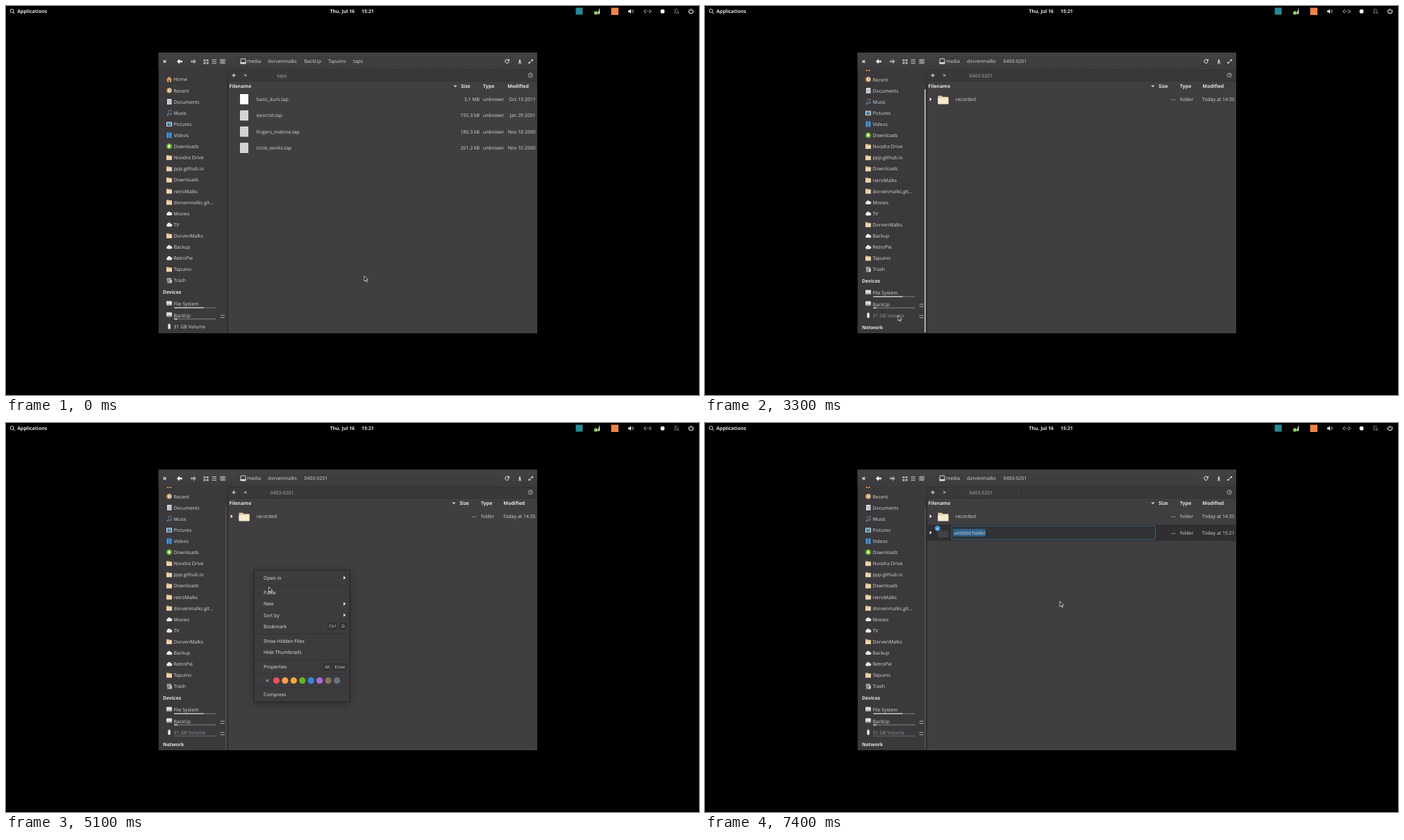
Recreate the animation shown at these times as an HTML page with a canvas. Size 998x561 px, loop 8000 ms.

```html
<!DOCTYPE html>
<html lang="en">
<head>
<meta charset="utf-8">
<title>File manager</title>
<style>
  html, body { margin: 0; width: 100%; height: 100%; overflow: hidden; background: #000; }
  canvas { display: block; }
</style>
</head>
<body>
<canvas id="stage" width="998" height="561"></canvas>
<script>
const ctx = document.getElementById('stage').getContext('2d');
const LOOP = 8000, STEP = 100, TAU = Math.PI * 2;
const LIGHT = '#d6d5d7', WHITE = '#f4f4f4';

// Times of the hard changes, in ms
const AT = { sidebar: 1000, network: 2300, open: 3200, usage: 3600, leave: 4300,
             menu: 4600, submenu: 5400, created: 6800, rename: 7000 };
const POINTER = [
  [400, 516, 389], [1200, 286, 459], [1300, 286, 459], [1500, 284, 459], [1800, 284, 459],
  [2300, 284, 454], [2600, 284, 454], [3000, 278, 446], [4100, 278, 446], [4500, 357, 212],
  [4900, 357, 212], [5300, 400, 260], [5800, 440, 262], [6100, 492, 262], [6500, 511, 259],
  [6900, 511, 259], [7200, 511, 257]
];

const smooth = (t, a, b) => {
  const p = Math.min(1, Math.max(0, (t - a) / (b - a)));
  return p * p * (3 - 2 * p);
};

function pointerAt(t) {
  let [, x, y] = POINTER[0];
  for (let i = 1; i < POINTER.length; i++) {
    const [start] = POINTER[i - 1], [end, nx, ny] = POINTER[i];
    const p = smooth(t, start, end);
    x += (nx - x) * p;
    y += (ny - y) * p;
  }
  return [x, y];
}

function rect(x, y, w, h, color) {
  ctx.fillStyle = color;
  ctx.fillRect(x, y, w, h);
}
function box(x, y, w, h, r, fill, stroke) {
  ctx.beginPath();
  ctx.roundRect(x, y, w, h, r);
  paint(fill, stroke);
}
function paint(fill, stroke, width = 1) {
  if (fill) { ctx.fillStyle = fill; ctx.fill(); }
  if (stroke) { ctx.strokeStyle = stroke; ctx.lineWidth = width; ctx.stroke(); }
}
function disc(x, y, r, fill, stroke, width) {
  ctx.beginPath();
  ctx.arc(x, y, r, 0, TAU);
  paint(fill, stroke, width);
}
// SVG path data drawn around (x, y)
function shape(x, y, d, fill, stroke, width) {
  ctx.save();
  ctx.translate(x, y);
  const path = new Path2D(d);
  if (fill) { ctx.fillStyle = fill; ctx.fill(path); }
  if (stroke) { ctx.strokeStyle = stroke; ctx.lineWidth = width || 1; ctx.stroke(path); }
  ctx.restore();
}
function text(str, x, y, { color = LIGHT, bold = false, align = 'left', size = 6.93 } = {}) {
  ctx.font = `${bold ? 700 : 400} ${size}px "Open Sans", "Noto Sans", sans-serif`;
  ctx.textAlign = align;
  ctx.fillStyle = color;
  ctx.fillText(str, x, y + 2.4);
}
const bold = (str, x, y) => text(str, x, y, { bold: true, color: '#e6e6e6' });
const right = (str, x, y, color) => text(str, x, y, { align: 'right', color });
const cross = (x, y, r, color, w) => shape(x, y, `M${-r} ${-r}L${r} ${r}M${r} ${-r}L${-r} ${r}`, null, color, w);
const triangle = (x, y) => shape(x, y, 'M-1.3-2.6L1.6 0L-1.3 2.6z', WHITE);

const icons = {
  home(y) {
    shape(235, y, 'M-4 0L0-4L4 0H3V4H-3V0z', '#d99a62');
    rect(234, y + 1, 2, 3, '#72472d');
  },
  recent(y) {
    disc(235, y, 3.9, '#c68a4e');
    disc(235.5, y - .3, 2.6, '#f0e4d2');
    shape(235, y, 'M.5-2V0H2', null, '#5a4632', .8);
  },
  documents(y) {
    box(232, y - 4, 6.5, 8, .5, '#d8dde0');
    for (let i = -2; i < 3; i += 2) rect(233.3, y + i, 4, .7, '#87929a');
  },
  music(y) {
    shape(235, y, 'M-1 3V-3L3-4V2', null, '#62809a', .9);
    disc(233, y + 3, 1.3, '#62809a');
    disc(237, y + 2, 1.3, '#62809a');
  },
  pictures(y) {
    box(231, y - 3, 8, 6.5, .5, '#d5e2ea');
    rect(232, y - 2, 6, 4.5, '#4f8fbd');
    shape(235, y, 'M-3 2.5L-1 0L1 2L2 1L3 2.5z', '#456b4a');
  },
  videos(y) {
    box(231.5, y - 4, 7, 8, .5, '#2f7fc1');
    for (let i = -3; i < 4; i += 2) {
      rect(232, y + i, .8, 1, '#cfe6f7');
      rect(237.2, y + i, .8, 1, '#cfe6f7');
    }
  },
  downloads(y) {
    disc(235, y, 4, '#62b325');
    shape(235, y, 'M-.9-2.3H.9V0H2.4L0 2.5L-2.4 0H-.9z', '#fff');
  },
  folder(y) {
    shape(235, y, 'M-4-3.4H-.8L0-2.6H4V3.6H-4z', '#d6b582');
    rect(231, y - 1.5, 8, 5.1, '#ecd5ac');
  },
  cloud(y) {
    shape(235, y, 'M-2.4 3A2 2 0 0 1-2.6-.8A2.6 2.6 0 0 1 2.2-1.2A2.1 2.1 0 0 1 2.4 3z', '#ececec');
  },
  trash(y) {
    shape(235, y, 'M-3.5-3.5H3L2.5 4H-2.5z', '#a9aaad');
    for (const x of [-1.5, .3]) rect(235 + x, y - 2, .8, 5, '#626367');
    rect(236.5, y - 1, 2.3, 4.6, '#d9d9d9');
  },
  drive(y) {
    box(231, y - 4.4, 8, 6.5, 1, '#dcdcdd');
    rect(231.3, y + .2, 7.4, 1.6, '#98989b');
  },
  stick(y) {
    box(233.4, y - 3.6, 3.4, 7.4, 1, '#eeeeee');
    rect(234, y - 4.2, 2.2, 1.8, '#a0a0a3');
  }
};

const PLACES = [
  ['Home', 'home'], ['Recent', 'recent'], ['Documents', 'documents'], ['Music', 'music'],
  ['Pictures', 'pictures'], ['Videos', 'videos'], ['Downloads', 'downloads'],
  ['Noodra Drive', 'folder'], ['ppp.github.io', 'folder'], ['Downloads', 'folder'],
  ['retroMalks', 'folder'], ['dorvenmalks.git…', 'folder'], ['Movies', 'cloud'], ['TV', 'cloud'],
  ['DorvenMalks', 'folder'], ['Backup', 'cloud'], ['RetroPie', 'cloud'], ['Tapuino', 'folder'],
  ['Trash', 'trash']
];
const FILES = [
  ['basic_kurs.tap', '3.1 MB', 'Oct 13 2011'], ['exorcist.tap', '155.3 kB', 'Jan 29 2001'],
  ['fingers_malone.tap', '180.3 kB', 'Nov 18 2000'], ['icicle_works.tap', '261.2 kB', 'Nov 10 2000']
];

function drawPanel() {
  disc(8.6, 7, 2.5, null, WHITE, .9);
  shape(8.6, 7, 'M1.8 1.8L4.2 4.4', null, WHITE, 1);
  bold('Applications', 16.3, 7.7);
  bold('Thu, Jul 16', 466.5, 7.7);
  bold('15:21', 512, 7.7);
  rect(820.5, 2.5, 10, 10, '#268994');
  shape(851, 7.5, 'M4-5V4H1zM0-1V4H-2z', '#e8e8e8');
  disc(849.5, 10, 2.8, '#6eb63b');
  shape(849.5, 10, 'M-1.4 0L-.3 1.2L1.6-1.2', null, '#fff', .8);
  rect(871.5, 2.5, 10.5, 10.5, '#ee8445');
  shape(900, 7.7, 'M-4-1.3H-2.3L0-3.4V3.4L-2.3 1.3H-4z', WHITE);
  shape(900, 7.7, 'M1.2-1.6Q2.4 0 1.2 1.6M2.6-2.8Q4.6 0 2.6 2.8', null, '#bbb', .8);
  shape(924, 7.7, 'M-2.5-2.6L-5 0L-2.5 2.6M2.5-2.6L5 0L2.5 2.6', null, WHITE, 1);
  for (const x of [-1.6, 0, 1.6]) disc(924 + x, 7.7, .5, WHITE);
  disc(945.5, 7.7, 3, WHITE);
  shape(965.5, 7.5, 'M-3.3 2.5Q-2 1-2-1Q-1.8-3.5 0-3.5Q1.8-3.5 2-1Q2 1 3.3 2.5zM-3.5-3.5L3.5 4', null, '#777', .9);
  shape(986.5, 7.7, 'M-1.7-2.6A3.1 3.1 0 1 0 1.7-2.6M0-4V-.2', null, WHITE, 1.1);
}

function drawHeader(opened) {
  const shade = ctx.createLinearGradient(0, 68, 0, 92);
  shade.addColorStop(0, '#444245');
  shade.addColorStop(1, '#3c3a3d');
  rect(219.5, 67.5, 545.5, 24.5, shade);
  rect(219.5, 67.5, 545.5, .8, '#4c4a4e');
  box(331.5, 72.5, 379, 15, 2, '#3f3d40');
  cross(228.5, 80, 1.9, WHITE, 1.2);
  shape(250, 80, 'M-4 0L0-3.7V-1.3H4V1.3H0V3.7z', WHITE);
  shape(270, 80, 'M4 0L0-3.7V-1.3H-4V1.3H0V3.7z', '#a3a2a4');
  for (const x of [284.5, 288.7]) for (const y of [77, 81]) rect(x, y, 3, 2.7, '#b2b1b3');
  for (let i = 0; i < 3; i++) rect(296.5, 77 + i * 2.5, 6.5, 1.1, '#b2b1b3');
  ctx.strokeStyle = '#b2b1b3';
  ctx.lineWidth = .9;
  for (let i = 0; i < 3; i++) ctx.strokeRect(308.8 + i * 2.2, 77.3, 2.2, 5.4);

  box(338, 76, 7, 7, 1, null, LIGHT);
  rect(337.5, 81, 8, 2.6, LIGHT);
  const crumbs = [['media', 347], ['dorvenmalks', 377]].concat(
    opened ? [['0403-0201', 429.5]] : [['BackUp', 429.5], ['Tapuino', 464], ['taps', 500]]);
  for (const [name, x] of crumbs) text(name, x, 80);

  shape(721.5, 79.7, 'M2.2-1.6A2.7 2.7 0 1 0 2.7 .6', null, WHITE, 1);
  shape(721.5, 79.7, 'M3.4-3.4V-.3H.4z', WHITE);
  shape(740, 80, 'M-.7-3H.7V0H2.2L0 2L-2.2 0H-.7zM-2.3 2.4H2.3V3.3H-2.3z', WHITE);
  shape(755.7, 80, 'M.5-3H3.2V-.3zM-3.2.3V3H-.5z', WHITE);
  shape(755.7, 80, 'M-2 2L2-2', null, WHITE, 1);

  rect(319, 92, 446, 16.5, '#3a383b');
  rect(319, 92, 446, .7, '#302e31');
  rect(335.5, 92, .7, 16, '#353336');
  rect(455, 92, .7, 16, '#312f32');
  rect(319, 108, 446, .7, '#353336');
  shape(328, 100, 'M-2.7 0H2.7M0-2.7V2.7', null, WHITE, 1);
  cross(344.7, 100, 1.6, LIGHT, 1);
  text(opened ? '0403-0201' : 'taps', 397.5, 100.3, { align: 'center', color: '#acabad' });
  disc(755.2, 99.8, 3, null, '#b7b6b8', .9);
  shape(755.2, 99.8, 'M0-1.8V.2H1.6', null, '#b7b6b8', .8);
}

function drawUsage(y, used, back) {
  box(242, y, 60.5, 1.7, .8, back);
  if (used) box(242, y, used, 1.7, .8, '#c4c3c5');
}
const eject = y => { for (const d of [0, 3.2]) rect(308.7, y + d, 6, .9, '#b5b4b6'); };

function drawSidebar(t) {
  const scroll = 16 * smooth(t, 1700, 2200);
  ctx.save();
  ctx.beginPath();
  ctx.rect(219.5, 92, 99.5, 380);
  ctx.clip();
  rect(219.5, 92, 100, 380, '#3b393c');
  ctx.translate(0, -scroll);

  PLACES.forEach(([name, icon], i) => {
    const y = 106 + i * 16.11;
    icons[icon](y - .3);
    text(name, 241.5, y);
  });
  bold('Devices', 226, 413);
  icons.drive(430);
  text('File System', 241.5, 430);
  drawUsage(434.4, 43, '#69676a');
  icons.drive(446.2);
  text('BackUp', 241.5, 446.2);
  drawUsage(450.6, 5, '#686b6a');
  eject(445.6);
  icons.stick(462);
  text('31 GB Volume', 241.5, 462.3, { color: t >= AT.sidebar ? '#969497' : LIGHT });
  if (t >= AT.open) eject(461.8);
  if (t >= AT.usage) drawUsage(466.6, 0, '#59575a');
  const networkHover = t >= AT.network && t < AT.open;
  if (networkHover) rect(219.5, 471, 100, 17, '#454346');
  bold('Network', 226, 479.2);
  if (networkHover) triangle(311.5, 479.2);
  ctx.restore();

  rect(318.6, 92, .8, 380, '#2f2d30');
  if (t >= AT.sidebar) {
    const color = t < AT.leave ? '#b9b8ba' : '#4f4d50';
    box(316, 93 + scroll * 27 / 16, 1.8, 351, .9, color);
  }
}

function drawFile([name, size, date], i) {
  const y = 134.6 + i * 23.4;
  box(337, y - 7.6, 12, 14.8, .6, i ? '#dcdcdc' : '#fdfdfd');
  if (i) for (let r = 0; r < 6; r++) for (let c = 0; c < 5; c++)
    rect(338.3 + c * 2 + r % 2, y - 5.6 + r * 2, .9, 1, '#b0b0b0');
  text(name, 360.8, y);
  right(size, 682, y);
  text('unknown', 687, y);
  right(date, 762.7, y);
}

function drawFolder(name, y, time, back = '#e4d0a8', front = '#f6ead0') {
  triangle(325, y);
  shape(343, y + .5, 'M-7.5-5.5H-2L-.7-4H7.5V6H-7.5z', back);
  box(335.5, y - 1.7, 15, 8.6, .6, front);
  if (name) text(name, 360.8, y);
  right('—', 678, y);
  text('folder', 684, y);
  right(time, 762.7, y);
}

function drawNewFolder(renaming) {
  rect(319.5, 146.6, 445.5, 23.2, renaming ? '#302e31' : '#3b9bef');
  if (renaming) {
    drawFolder('', 158.1, 'Today at 15:21', '#39383a', '#444245');
    box(355.5, 148.2, 293, 19.8, 1, '#303234', '#3c6178');
    rect(357.8, 152.8, 46, 10.8, '#2f628f');
    text('untitled folder', 358, 158.1);
  } else {
    drawFolder('untitled folder', 158.1, 'Today at 15:21', '#4096ab', '#58adb9');
  }
  disc(334.8, 152, 3.7, renaming ? '#3f9dec' : '#62b4f7', renaming ? null : '#338bd5', .7);
  shape(334.8, 152, 'M-1.7 0L-.4 1.4L1.8-1.3', null, '#fff', .9);
}

function drawList(t) {
  const opened = t >= AT.open;
  rect(319.4, 108.6, 445.6, 363.4, '#403e41');
  bold('Filename', 321.5, 115.8);
  shape(opened ? 645 : 647, 115.8, 'M-2.6-1.3H2.6L0 1.4z', LIGHT);
  bold('Size', opened ? 653.3 : 655.3, 115.8);
  bold('Type', opened ? 684 : 687, 115.8);
  bold('Modified', opened ? 716.6 : 722.2, 115.8);
  if (!opened) return FILES.forEach(drawFile);
  drawFolder('recorded', 134.6, 'Today at 14:35');
  if (t >= AT.created) drawNewFolder(t >= AT.rename);
}

function popup(x, y, w, h) {
  ctx.save();
  ctx.shadowColor = 'rgba(0,0,0,.4)';
  ctx.shadowBlur = 12;
  ctx.shadowOffsetY = 2;
  box(x, y, w, h, 1.5, '#3d3b3e');
  ctx.restore();
  box(x, y, w, h, 1.5, null, '#29272a');
}
function keycap(label, x, w, y) {
  box(x, y - 5.4, w, 10.8, 1.2, '#343235');
  text(label, x + w / 2, y - .2, { size: 6.1, align: 'center' });
}

function drawMenu(t, pointerX) {
  popup(357.5, 212.5, 137.5, 189.5);
  if (t >= 5300) rect(358, 252.8, 136.6, 16.2, '#555356');
  const rows = [['Open in', 223.6], ['Paste', 244.8], ['New', 261], ['Sort by', 277.1], ['Bookmark', 293.2],
    ['Show Hidden Files', 314.4], ['Hide Thumbnails', 330.5], ['Properties', 351.9], ['Compress', 392]];
  for (const [name, y] of rows) text(name, 371, y, { color: '#e6e5e7' });
  for (const y of [223.2, 260.8, 277]) triangle(487.5, y);
  for (const y of [234, 303.7, 341.2, 361.7, 381.5]) rect(358, y, 136.5, .8, '#333134');
  keycap('Ctrl', 463, 14.2, 293.2);
  keycap('D', 480, 10.8, 293.2);
  keycap('Alt', 456.5, 12.4, 351.9);
  keycap('Enter', 471, 20.4, 351.9);
  cross(376.3, 371.5, 1.8, LIGHT, .9);
  ['#ed5353', '#ff9d4d', '#f8a63e', '#68b723', '#3689d6', '#a56de2', '#8e7060', '#667380']
    .forEach((color, i) => disc(389.4 + i * 12.45, 371.4, 4.6, color));

  if (t < AT.submenu) return;
  popup(493.5, 250.5, 102, 36.5);
  if (pointerX > 497) rect(494, 252.8, 101.2, 16.2, '#555356');
  text('Folder', 507, 261, { color: '#e6e5e7' });
  text('Empty File', 507, 277.1, { color: '#e6e5e7' });
  keycap('Shift', 543.7, 17, 261);
  keycap('Ctrl', 563.6, 14.2, 261);
  keycap('N', 581, 10.8, 261);
}

function render(t) {
  const [x, y] = pointerAt(t);
  rect(0, 0, 998, 561, '#000');
  drawPanel();
  drawHeader(t >= AT.open);
  drawList(t);
  drawSidebar(t);
  if (t >= AT.menu && t < AT.created) drawMenu(t, x);
  shape(x, y, 'M0 .2V7.9L1.8 6.3L3 9L4.3 8.4L3.1 5.8H5.3z', '#1b1a1c', '#f2f2f2', .75);
}

ctx.textRendering = 'geometricPrecision';
function tick() {
  const t = performance.now() % LOOP;
  render(Math.floor(t / STEP) * STEP);
  requestAnimationFrame(tick);
}
tick();
</script>
</body>
</html>
```
